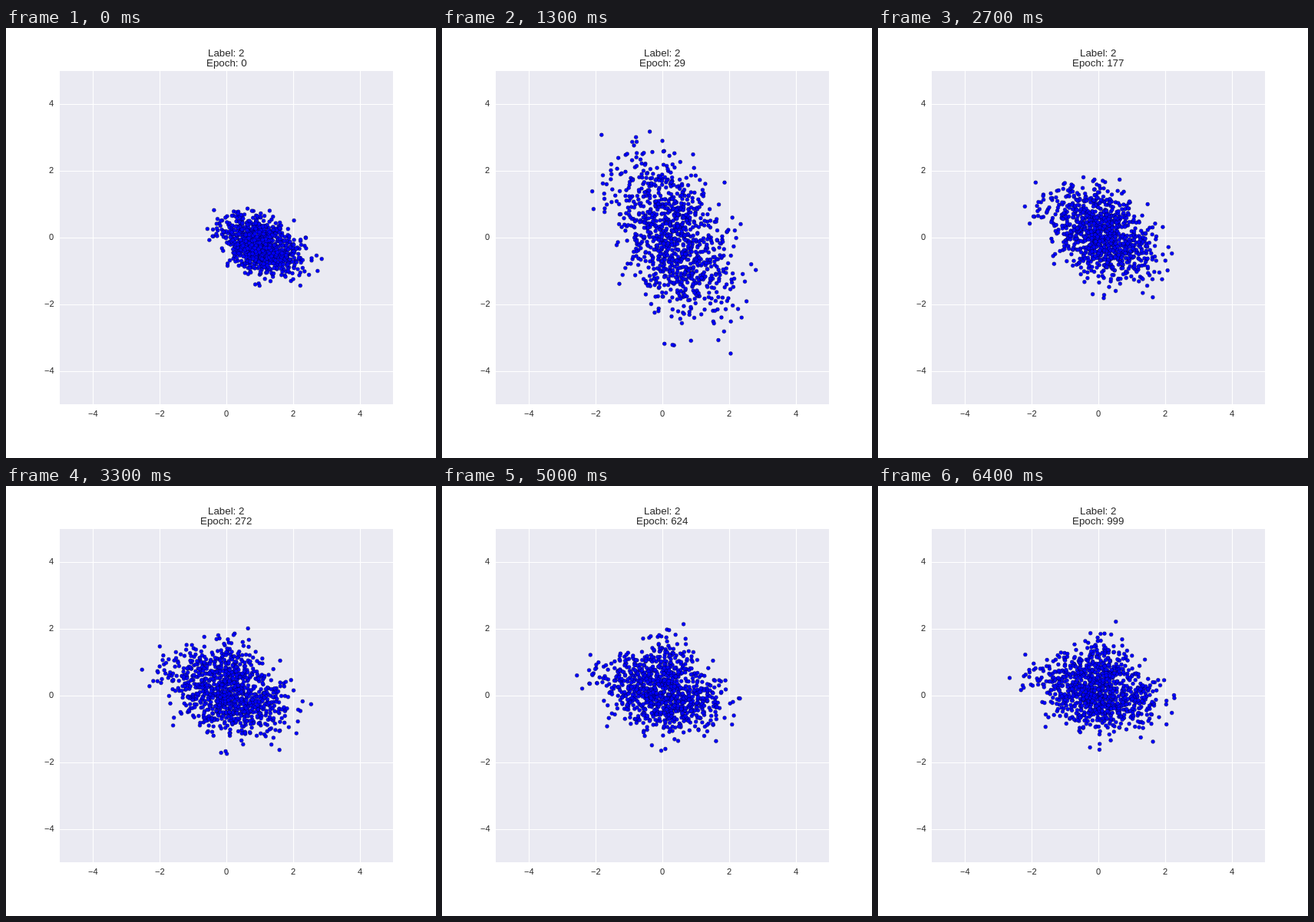
Write an HTML page with a canvas that moves like this. It is 560 px wide and 560 px high and loops after 6500 ms.

```html
<!DOCTYPE html>
<html lang="en">
<head>
<meta charset="utf-8">
<title>Latent scatter</title>
<style>
  html, body { margin: 0; width: 100%; height: 100%; overflow: hidden; background: #fff; }
  canvas { display: block; }
</style>
</head>
<body>
<canvas id="stage" width="560" height="560"></canvas>
<script>
const ctx = document.getElementById('stage').getContext('2d');
const STEP = 100, STEPS = 65, COUNT = 1000;
const LEFT = 70, TOP = 56, SIZE = 434, UNIT = 43.4;
const FONT = '"Liberation Sans", Arial, sans-serif';
const TICKS = [-4, -2, 0, 2, 4];

const px = x => LEFT + SIZE / 2 + x * UNIT;
const py = y => TOP + SIZE / 2 - y * UNIT;

// Falls from 1 towards 0 over the given number of steps
const decay = (n, span) => Math.exp(-n / span);

// Eases from 0 to 1 between two steps
function ease(n, from, to) {
  const k = Math.min(1, Math.max(0, (n - from) / (to - from)));
  return k * k * (3 - 2 * k);
}

let seed = 20717;
function rand() {
  seed = (seed * 1664525 + 1013904223) % 4294967296;
  return (seed + 0.5) / 4294967296;
}

// A point of a round normal cloud, with its own slow wander
function makePoint() {
  const r = Math.min(Math.sqrt(-2 * Math.log(rand())), 3.2);
  const a = 2 * Math.PI * rand();
  return {
    u: r * Math.cos(a), v: r * Math.sin(a),
    rate: 0.15 + 0.4 * rand(), phase: 2 * Math.PI * rand()
  };
}
const points = Array.from({ length: COUNT }, makePoint);

// Counts singly at first, then ever faster up to 999
function epochAt(n) {
  return n < 9 ? n : Math.floor(7 + 992 * ((n - 7) / 57) ** 1.68);
}

// The cloud bursts open early, collapses, then settles into a humped blob
function shapeAt(n) {
  const burst = (n / 6 * Math.exp(1 - n / 6)) ** 1.5;
  const lean = Math.exp(-(((n - 20) / 12) ** 2));
  return {
    mx: decay(n, 12),
    my: 0.13 - 0.36 * decay(n, 15),
    sx: 0.5 + 0.31 * ease(n, 15, 35) + 0.52 * burst,
    sy: 0.53 + 0.25 * decay(n, 25) - 0.36 * decay(n, 3) + 0.85 * burst,
    corr: -0.36 - 0.14 * lean + 0.1 * n / STEPS,
    skew: 0.1 * decay(n, 12),
    hump: 0.65 * ease(n, 15, 45)
  };
}

function drawCloud(n) {
  const s = shapeAt(n);
  const rest = Math.sqrt(1 - s.corr ** 2);
  ctx.fillStyle = '#0000ff';
  ctx.strokeStyle = '#000';
  ctx.lineWidth = 0.33;
  for (const p of points) {
    let u = p.u + 0.1 * Math.sin(n * p.rate + p.phase);
    let v = p.v + 0.1 * Math.cos(n * p.rate * 1.3 + p.phase);
    if (v > 0) v *= 1 + s.hump * (Math.exp(-((u - 0.3) ** 2)) - 0.3);
    if (u > 0) u += s.skew * u * u;
    ctx.beginPath();
    ctx.arc(px(s.mx + s.sx * u), py(s.my + s.sy * (s.corr * u + rest * v)), 2.48, 0, 2 * Math.PI);
    ctx.fill();
    ctx.stroke();
  }
}

function drawGrid() {
  ctx.fillStyle = '#eaeaf2';
  ctx.fillRect(LEFT, TOP, SIZE, SIZE);
  ctx.strokeStyle = '#fff';
  ctx.lineWidth = 1.11;
  ctx.beginPath();
  for (const t of TICKS) {
    const x = Math.round(px(t)) + 0.5, y = Math.round(py(t)) + 0.5;
    ctx.moveTo(x, TOP);
    ctx.lineTo(x, TOP + SIZE);
    ctx.moveTo(LEFT, y);
    ctx.lineTo(LEFT + SIZE, y);
  }
  ctx.stroke();
}

// Anchor: 0.5 centres the text on x, 1 ends it there; it starts on a whole pixel
function text(s, x, y, size, anchor) {
  ctx.font = `${size}px ${FONT}`;
  ctx.fillText(s, Math.round(x - anchor * ctx.measureText(s).width), y);
}

function drawLabels(n) {
  ctx.fillStyle = '#262626';
  for (const t of TICKS) {
    const s = String(t).replace('-', '\u2212');
    text(s, px(t), 506, 11.11, 0.5);
    text(s, 62.2, Math.round(py(t)) + 3, 11.11, 1);
  }
  text('Label: 2', 287, 37, 13.33, 0.5);
  text('Epoch: ' + epochAt(n), 287, 50, 13.33, 0.5);
}

function draw(n) {
  ctx.fillStyle = '#fff';
  ctx.fillRect(0, 0, 560, 560);
  drawGrid();
  ctx.save();
  ctx.beginPath();
  ctx.rect(LEFT, TOP, SIZE, SIZE);
  ctx.clip();
  drawCloud(n);
  ctx.restore();
  drawLabels(n);
}

let shown = -1;
function tick() {
  const n = Math.floor(performance.now() / STEP) % STEPS;
  if (n !== shown) draw(shown = n);
  requestAnimationFrame(tick);
}
tick();
</script>
</body>
</html>
```
